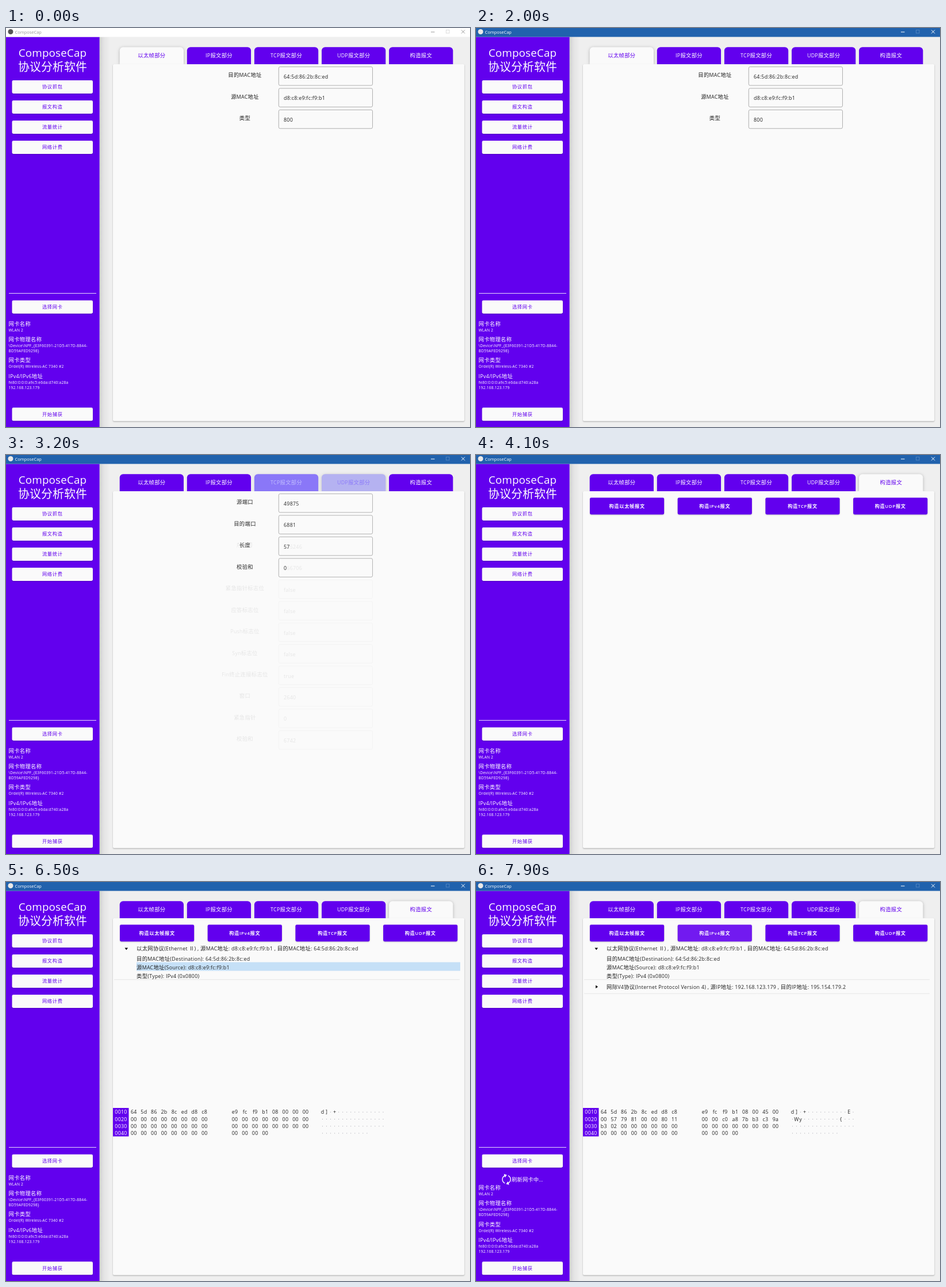
Recreate the animation shown at these times as an HTML page with a canvas. Size 807 by 694 pixels, loop 8000 ms.

```html
<!DOCTYPE html>
<html lang="zh">
<head>
<meta charset="utf-8">
<style>
html, body { margin: 0; width: 807px; height: 694px; overflow: hidden; background: #efefef; }
canvas { display: block; }
</style>
</head>
<body>
<canvas id="stage" width="807" height="694"></canvas>
<script>
const ctx = document.getElementById('stage').getContext('2d');
const LOOP = 8000, FADE = 300;
const PURPLE = '#6200ee', PAPER = '#fafafa', INK = '#202020';
const FONT = '"Open Sans", "Noto Sans CJK SC", "Noto Sans CJK", sans-serif';
const MAC_TO = '64:5d:86:2b:8c:ed', MAC_FROM = 'd8:c8:e9:fc:f9:b1';
const IP_FROM = '192.168.123.179', IP_TO = '195.154.179.2';

const tabs = ['以太帧部分', 'IP报文部分', 'TCP报文部分', 'UDP报文部分', '构造报文'];
const forms = [
  [['目的MAC地址', MAC_TO], ['源MAC地址', MAC_FROM], ['类型', '800']],
  [['版本号', '4'], ['首部长度', '5'], ['总长度', '87'], ['标识号', '7981'],
   ['保留标识符', 'false', true], ['不分段标识符', 'false'], ['更多分段标识符', 'false'],
   ['片段偏移', '0'], ['生存时间', '128'], ['协议', '17'], ['首部校验和', '0000'],
   ['源IP地址', IP_FROM], ['目的IP地址', IP_TO]],
  [['源端口', '49875'], ['目的端口', '6881'], ['序列号', '525246'], ['确认号', '066706'],
   ['紧急指针标志位', 'false'], ['应答标志位', 'false'], ['Push标志位', 'false'],
   ['Syn标志位', 'false'], ['Fin终止连接标志位', 'true'], ['窗口', '2640'],
   ['紧急指针', '0'], ['校验和', '6742']],
  [['源端口', '49875'], ['目的端口', '6881'], ['长度', '57'], ['校验和', '0']],
];
const builders = ['构造以太帧报文', '构造IPv4报文', '构造TCP报文', '构造UDP报文'];
const switches = [[-FADE, 0], [900, 1], [1700, 0], [2300, 2], [3000, 3], [3800, 4]];
const refreshes = [[2600, 3150], [7800, LOOP]];
// Hovered tree line: 0 is the heading, 1 and 2 are the fields below it
const hovers = [[6100, 6300, 1], [6300, 6600, 2], [6600, 7400, 1], [7400, 7600, 0]];

const ethernetHex = '64 5d 86 2b 8c ed d8 c8 e9 fc f9 b1 08 00';
const ipHex = ethernetHex + ' 45 00 00 57 79 81 00 00 80 11 00 00 c0 a8 7b b3 c3 9a b3 02';

const clamp = v => Math.max(0, Math.min(1, v));
const ease = x => 1 - (1 - x ** 1.5) ** 3;
const within = (t, [from, to]) => t >= from && t < to;
const mix = (a, b, p) => p <= 0 ? a : p >= 1 ? b : `color-mix(in oklab, ${a} ${100 - p * 100}%, ${b})`;

// Draws mixed text around the vertical centre y, on a whole-pixel baseline;
// Latin runs are set a little smaller.
function text(str, x, y, { size = 9.36, gap = 0.29, color = INK, align = 0, weight = 400 } = {}) {
  ctx.letterSpacing = gap + 'px';
  const runs = str.match(/[\u2e80-\uffff]+|[^\u2e80-\uffff]+/g).map(run => {
    const font = `${weight} ${run[0] >= '\u2e80' ? size : size * 0.945}px ${FONT}`;
    ctx.font = font;
    return { run, font, width: ctx.measureText(run).width };
  });
  x -= align * runs.reduce((sum, r) => sum + r.width, 0);
  ctx.fillStyle = color;
  for (const r of runs) {
    ctx.font = r.font;
    ctx.fillText(r.run, x, Math.round(y + size * 0.36));
    x += r.width;
  }
}

function box(x, y, w, h, color, radius = 0) {
  ctx.fillStyle = color;
  ctx.beginPath();
  ctx.roundRect(x, y, w, h, radius);
  ctx.fill();
}

function shadowed(alpha, blur, dy, draw) {
  ctx.save();
  ctx.shadowColor = `rgba(0,0,0,${alpha})`;
  ctx.shadowBlur = blur;
  ctx.shadowOffsetY = dy;
  draw();
  ctx.restore();
}

function line(x1, y1, x2, y2, color, width = 1) {
  ctx.strokeStyle = color;
  ctx.lineWidth = width;
  ctx.beginPath();
  ctx.moveTo(x1, y1);
  ctx.lineTo(x2, y2);
  ctx.stroke();
}

function triangle(x, y, angle, r, color) {
  ctx.save();
  ctx.translate(x, y);
  ctx.rotate(angle);
  ctx.fillStyle = color;
  ctx.beginPath();
  ctx.moveTo(r, 0);
  ctx.lineTo(-r * 0.4, -r);
  ctx.lineTo(-r * 0.4, r);
  ctx.fill();
  ctx.restore();
}

function button(label, x, y, w, h, fill, color, weight = 500) {
  shadowed(0.2, 2, 1, () => box(x, y, w, h, fill, 2.4));
  text(label, x + w / 2, y + h / 2, { size: 8.2, gap: 0.73, color, align: 0.5, weight });
}

function titleBar(active) {
  const color = active ? '#fff' : '#999';
  box(0, 0, 807, 15.5, active ? '#2162ad' : '#fff');
  box(3.5, 2, 9, 9, active ? '#e8e8e8' : '#555', 4.5);
  text('ComposeCap', 15.5, 6.8, { size: 7.9, gap: 0, color });
  line(739, 7, 745.5, 7, color);
  ctx.strokeStyle = active ? '#4d82c0' : '#ddd';
  ctx.strokeRect(765.5, 3.5, 5.5, 5.5);
  line(792, 3.5, 798, 9.5, color);
  line(798, 3.5, 792, 9.5, color);
}

function spinner(x, y, angle) {
  ctx.save();
  ctx.translate(x, y);
  ctx.rotate(angle);
  for (let i = 0; i < 2; i++) {
    ctx.strokeStyle = '#fff';
    ctx.lineWidth = 1.4;
    ctx.beginPath();
    ctx.arc(0, 0, 7.2, -1.3, 1.1);
    ctx.stroke();
    triangle(3.2, 6.5, 2.7, 3.2, '#fff');
    ctx.rotate(Math.PI);
  }
  ctx.restore();
}

function sidebar(t) {
  const shade = ctx.createLinearGradient(162.6, 0, 181, 0);
  shade.addColorStop(0, 'rgba(0,0,0,.13)');
  shade.addColorStop(0.4, 'rgba(0,0,0,.05)');
  shade.addColorStop(1, 'rgba(0,0,0,0)');
  box(162, 15.5, 19, 679, shade);
  box(0, 15.5, 162.6, 679, PURPLE);
  const white = { color: '#fff' };
  const title = { ...white, size: 19.9, gap: 0.15, align: 0.5 };
  text('ComposeCap', 81, 42.5, title);
  text('协议分析软件', 81, 67.5, title);
  const entries = [['协议抓包', 91], ['报文构造', 126], ['流量统计', 161], ['网络计费', 196],
                   ['选择网卡', 473.7], ['开始捕获', 660.3]];
  for (const [label, y] of entries) button(label, 10.5, y, 140.5, 23, PAPER, PURPLE);
  line(5, 461.5, 157, 461.5, 'rgba(255,255,255,.85)');

  const refresh = refreshes.find(r => within(t, r));
  const dy = refresh ? 17.6 : 0;
  if (refresh) {
    spinner(53, 517.3, (t - refresh[0]) / 1000 * 2 * Math.PI - 0.5);
    text('刷新网卡中...', 62, 518, { ...white, gap: 0.1 });
  }
  for (const [label, y] of [['网卡名称', 514.5], ['网卡物理名称', 541.5], ['网卡类型', 578], ['IPv4/IPv6地址', 605.3]])
    text(label, 4.5, y + dy, white);
  for (const [label, y] of [['WLAN 2', 525], ['\\Device\\NPF_{E3F60391-21D5-417D-8844-', 552],
    ['BD59AFED9298}', 561.3], ['Ordel(R) Wireless-AC 7340 #2', 588.5],
    ['fe80:0:0:0:a9c5:e6da:d740:a28a', 616], [IP_FROM, 625]])
    text(label, 4.5, y + dy, { ...white, size: 7, gap: 0.23 });
}

function tabBar(t, from, to, start) {
  const p = clamp((t - start) / FADE);
  tabs.forEach((label, i) => {
    const x = 197.7 + 117.1 * i;
    const chosen = i === to ? p : i === from ? 1 - p : 0;
    const shape = color => box(x, 33.3, 111.3, 30, color, [6, 6, 0, 0]);
    shadowed(0.28 * chosen, 5, 1, () => shape(mix(PURPLE, PAPER, chosen)));
    if (i === to && t >= start - 100 && p < 1) shape(`rgba(0,0,0,${0.14 * (1 - p)})`);
    text(label, x + 55.7, 48, { color: mix('#ffffff', PURPLE, chosen), align: 0.5 });
  });
}

function form(rows) {
  rows.forEach(([label, value, disabled], i) => {
    const y = 37.45 * i;
    text(label, 415.5, 82 + y, { align: 0.5 });
    ctx.strokeStyle = '#9c9c9c';
    ctx.lineWidth = 0.8;
    ctx.beginPath();
    ctx.roundRect(474.3, 67.5 + y, 163.2, 32.4, 2.4);
    ctx.stroke();
    text(value, 483, 84.6 + y, { color: disabled ? '#8a8a8a' : INK });
  });
}

function hexDump(hex) {
  const bytes = hex.split(' ');
  while (bytes.length < 60) bytes.push('00');
  box(186, 393, 27.5, 49.4, PURPLE);
  for (let row = 0; row < 4; row++)
    text(`00${row + 1}0`, 200, 400 + 12.25 * row, { color: '#fff', align: 0.5 });
  bytes.forEach((byte, i) => {
    const col = i % 16, y = 400 + 12.25 * (i >> 4);
    text(byte, 222.3 + 17.57 * col + (col > 7 ? 35.2 : 0), y, { align: 0.5 });
    const code = parseInt(byte, 16), x = 550.5 + 7.03 * col;
    if (code > 32 && code < 127) text(String.fromCharCode(code), x, y, { align: 0.5 });
    else box(x - 0.5, y - 0.3, 1, 1, '#a0a0aa');
  });
}

function tree(t) {
  const open = t >= 5900, rule = y => line(188, y, 789, y, '#e6e6e6');
  const hover = hovers.find(h => within(t, h));
  if (hover) {
    const [y, h] = [[103.5, 23.5], [125, 14.5], [139.5, 15]][hover[2]];
    box(227, y, 563, h, '#c5e0f7');
  }
  triangle(209.3, 115.5, open ? Math.PI / 2 : 0, 2.8, '#000');
  text(`以太网协议(Ethernet Ⅱ) , 源MAC地址: ${MAC_FROM} , 目的MAC地址: ${MAC_TO}`, 227, 116);
  if (open) {
    text(`目的MAC地址(Destination): ${MAC_TO}`, 227, 133.3);
    text(`源MAC地址(Source): ${MAC_FROM}`, 227, 148.8);
    text('类型(Type): IPv4 (0x0800)', 227, 164);
  }
  rule(open ? 169.8 : 127.5);
  if (t >= 7700) {
    triangle(209.3, 182.3, 0, 2.8, '#000');
    text(`网际V4协议(Internet Protocol Version 4) , 源IP地址: ${IP_FROM} , 目的IP地址: ${IP_TO}`, 227, 182.8);
    rule(194);
  }
}

function builder(t) {
  const hovered = within(t, [4600, 4900]) ? 0 : t >= 7600 ? 1 : -1;
  builders.forEach((label, i) =>
    button(label, 198 + 152.7 * i, 74.2, 129.2, 29.3, i === hovered ? '#721af0' : PURPLE, '#fff', 600));
  if (t < 4700) return;
  tree(t);
  hexDump(t >= 7700 ? ipHex : ethernetHex);
}

function page(index, t, alpha) {
  if (alpha <= 0) return;
  ctx.globalAlpha = alpha;
  index < 4 ? form(forms[index]) : builder(t);
  ctx.globalAlpha = 1;
}

function render(t) {
  box(0, 0, 807, 694, '#efefef');
  // A press shows one step before its page starts to fade in
  const k = switches.findLastIndex(([start]) => t >= start - 100);
  const [start, to] = switches[k];
  const from = k ? switches[k - 1][1] : to;
  tabBar(t, k ? from : -1, to, start);
  shadowed(0.3, 2, 1, () => box(186, 63, 611.3, 620.7, PAPER, 2));
  const shown = ease(clamp((t - start) / FADE));
  if (k) page(from, t, 1 - shown);
  page(to, t, shown);
  sidebar(t);
  titleBar(t >= 800);
}

// The screen refreshes ten times a second
function frame() {
  render(Math.floor(performance.now() % LOOP / 100) * 100);
  requestAnimationFrame(frame);
}
frame();
</script>
</body>
</html>
```
